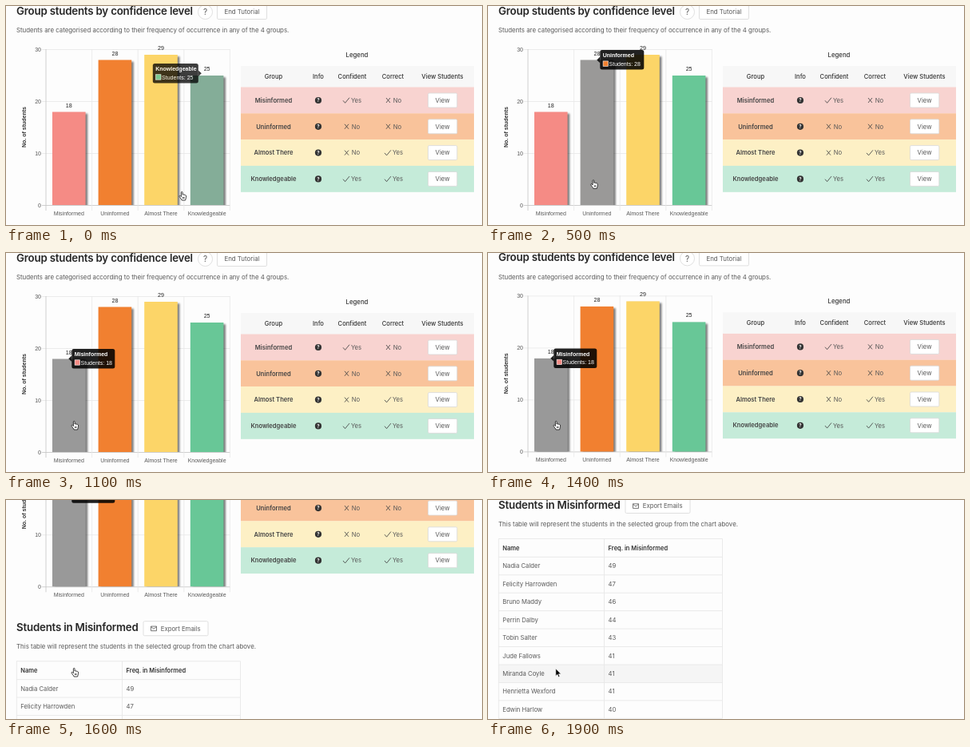
Recreate the animation shown at these times as an HTML page. Size 596 by 274 pixels, loop 2500 ms.

```html
<!DOCTYPE html>
<html lang="en">
<head>
<meta charset="utf-8">
<title>Students by confidence level</title>
<style>
  html, body { margin: 0; width: 100%; height: 100%; overflow: hidden; background: #fdfdfd; }
  svg { display: block; width: 596px; height: 274px; font-family: Inter, sans-serif; }
  .chart { font-family: "Liberation Sans", Arial, sans-serif; }
</style>
</head>
<body>
<svg id="stage" viewBox="0 0 596 274">
  <defs>
    <filter id="soft" x="-20%" y="-10%" width="140%" height="120%"><feGaussianBlur stdDeviation="1.3"/></filter>
    <clipPath id="plot"><rect x="50" y="40" width="231" height="209"/></clipPath>
  </defs>
</svg>
<script>
const LOOP = 2500, STEP = 100, SCROLL = 294;
const stage = document.getElementById('stage');

function add(parent, tag, attrs = {}, text) {
  const node = document.createElementNS('http://www.w3.org/2000/svg', tag);
  set(node, attrs);
  if (text !== undefined) node.textContent = text;
  parent.append(node);
  return node;
}
function set(node, attrs) {
  for (const key in attrs) node.setAttribute(key, attrs[key]);
}
const rect = (p, x, y, width, height, fill, more) => add(p, 'rect', { x, y, width, height, fill, ...more });
const line = (p, d, stroke = '#e5e5e5', width = 1, more) =>
  add(p, 'path', { d, stroke, 'stroke-width': width, fill: 'none', ...more });
const label = (p, x, y, text, size, more) =>
  add(p, 'text', { x, y, 'font-size': size, fill: '#595959', ...more }, text);
const MID = { 'text-anchor': 'middle' };
const BOLD = { 'font-weight': 600, fill: '#333' };

function button(x, y, w, h, text, textX, size = 7.8) {
  rect(page, x, y, w, h, '#fff', { rx: 1.5, stroke: '#d9d9d9', 'stroke-width': .8 });
  return label(page, textX, y + h / 2 + 2.8, text, size, MID);
}

const page = add(stage, 'g');

// Heading
const HEAD = { 'font-weight': 600, fill: '#262626', 'letter-spacing': '-.2' };
label(page, 13, 11, 'Group students by confidence level', 13.3, HEAD);
add(page, 'circle', { cx: 249.5, cy: 7.5, r: 9, fill: '#fff', stroke: '#d9d9d9', 'stroke-width': .8 });
label(page, 249.5, 11.2, '?', 10, MID);
button(264.5, -1.5, 62, 18, 'End Tutorial', 295.5, 7.9);
label(page, 13, 33.2, 'Students are categorised according to their frequency of occurrence in any of the 4 groups.', 7.86);

// Bar chart
const groups = [
  { name: 'Misinformed', count: 18, rgb: [245, 139, 133], tint: '#f8d3d0', confident: true, correct: false },
  { name: 'Uninformed', count: 28, rgb: [241, 128, 48], tint: '#f9c39b', confident: false, correct: false },
  { name: 'Almost There', count: 29, rgb: [252, 213, 104], tint: '#fdf0c5', confident: false, correct: true },
  { name: 'Knowledgeable', count: 25, rgb: [104, 199, 151], tint: '#c5ebd9', confident: true, correct: true }
];
const BASE = 249.5, UNIT = 6.5, SLOT = 57.6;
const chart = add(page, 'g', { class: 'chart' });
for (let n = 0; n <= 30; n += 10) {
  const y = BASE - n * UNIT;
  line(chart, `M45 ${y}H280.5`, n ? '#e8e8e8' : '#c4c4c4', .8);
  label(chart, 44, y + 2.5, n, 7, { 'text-anchor': 'end' });
}
for (let i = 0; i <= 4; i++) line(chart, `M${50 + i * SLOT} 54V256`, i ? '#e8e8e8' : '#c4c4c4', .8);
label(chart, 0, 0, 'No. of students', 7, { ...MID, ...BOLD, transform: 'translate(25.3 151.5) rotate(-90)' });

const bars = add(chart, 'g', { 'clip-path': 'url(#plot)' });
groups.forEach((g, i) => {
  g.mid = 50 + SLOT * (i + .5);
  g.top = BASE - g.count * UNIT;
  const x = g.mid - 20.8, h = BASE - g.top;
  rect(bars, x + 2.6, g.top + 2.2, 41.6, h + 8, '#000', { opacity: .5, filter: 'url(#soft)' });
  g.bar = rect(bars, x, g.top, 41.6, h);
  label(chart, g.mid, g.top - 6, g.count, 7.1, { ...MID, fill: '#222' });
  label(chart, g.mid, 262, g.name, 7, MID);
});

// Legend
const columns = [335, 391, 433.5, 484.5, 546.5];
label(page, 439.5, 64, 'Legend', 7.8, { ...MID, fill: '#333', 'font-weight': 500 });
rect(page, 294, 75, 292, 26.5, '#f7f7f7');
['Group', 'Info', 'Confident', 'Correct', 'View Students'].forEach((text, i) =>
  label(page, columns[i], 90.8, text, 7.6, { ...MID, ...BOLD, 'font-weight': 500 }));

function verdict(x, y, yes) {
  line(page, yes ? `M${x - 11.5} ${y + .3}l2.6 3 5.4 -6.6` : `M${x - 9.5} ${y - 3}l5 6m0 -6l-5 6`, '#444', .85);
  label(page, x - (yes ? 1.6 : .8), y + 2.8, yes ? 'Yes' : 'No', 7.7);
}
groups.forEach((g, i) => {
  const y = 118 + i * 32.8;
  rect(page, 294, y - 16.5, 292, 32.9, g.tint);
  label(page, 335, y + 2.7, g.name, 7.6, { ...MID, ...BOLD, fill: '#444' });
  add(page, 'circle', { cx: 391, cy: y, r: 4.1, fill: '#333' });
  label(page, 391, y + 2.2, '?', 6, { ...MID, fill: '#fff', 'font-weight': 700 });
  verdict(433.5, y, g.confident);
  verdict(485.5, y, g.correct);
  button(528.5, y - 9, 36.3, 18, 'View', 546.6);
});

// Student table
label(page, 13, 304.8, 'Students in Misinformed', 13.3, HEAD);
button(172, 292.5, 81, 18, 'Export Emails', 218.7);
line(page, 'M181.5 298.8h7v5.6h-7zM181.5 299.2l3.5 2.8 3.5 -2.8', '#555', .8);
label(page, 13, 327, 'This table will represent the students in the selected group from the chart above.', 7.88);

const students = [
  ['Nadia Calder', 49], ['Felicity Harrowden', 47], ['Bruno Maddy', 46],
  ['Perrin Dalby', 44], ['Tobin Salter', 43], ['Jude Fallows', 41],
  ['Miranda Coyle', 41], ['Henrietta Wexford', 41], ['Edwin Harlow', 40]
];
const TOP = 342.5, ROW = 22.45;
const rowTop = i => TOP + 22.8 + i * ROW;
const rowHover = rect(page, 13, rowTop(6), 280.5, ROW, '#f5f5f5');
label(page, 18.3, 356.7, 'Name', 7.5, BOLD);
label(page, 150.6, 356.7, 'Freq. in Misinformed', 7.5, BOLD);
line(page, `M13 ${TOP}H293.5`, '#e8e8e8', .9);
students.forEach(([name, freq], i) => {
  line(page, `M13 ${rowTop(i)}H293.5`, '#e8e8e8', .9);
  label(page, 18.3, rowTop(i) + 14, name, 7.7);
  label(page, 150.6, rowTop(i) + 14, freq, 7.7);
});
line(page, `M13 ${rowTop(9)}H293.5M13.4 ${TOP}V${rowTop(9)}M145.5 ${TOP}V${rowTop(9)}M293.5 ${TOP}V${rowTop(9)}`, '#e8e8e8', .9);

// Tooltip
const tip = add(page, 'g', { class: 'chart' });
const tipBox = rect(tip, 0, 0, 55, 24.5, '#000', { rx: 2.5, 'fill-opacity': .87 });
const tipCaret = add(tip, 'path', { 'fill-opacity': .87 });
const tipTitle = label(tip, 3.4, 9.2, '', 7, { fill: '#fff', 'font-weight': 700 });
const tipSwatch = rect(tip, 3.8, 13.8, 6.4, 6.4, '', { stroke: '#fff', 'stroke-width': .6 });
const tipBody = label(tip, 11.3, 19.6, '', 7, { fill: '#fff' });

// Pointers
const hand = add(stage, 'path', {
  d: 'M-1.6 -4.8c0 -1.1 1.7 -1.1 1.7 0v2.8c.3 -.6 1.5 -.5 1.6 .3c.4 -.5 1.4 -.3 1.5 .4c.5 -.4 1.3 0 1.3 .7v2.2c0 1.4 -.9 1.9 -.9 3.4h-4.5c-.3 -1.5 -1.9 -2.5 -3 -4.6c-.4 -.9 .7 -1.5 1.3 -.8l1 1zM.6 1v2M2 1v2',
  fill: '#fff', stroke: '#111', 'stroke-width': .8, 'stroke-linejoin': 'round'
});
const arrow = add(stage, 'path', {
  d: 'M84.8 211v9.3l2.1 -2 1.4 3.2 1.5 -.7 -1.4 -3h3z', fill: '#000', stroke: '#fff', 'stroke-width': .6
});

// Motion: each hover pulls the tooltip to its bar and greys the bar
const easeOut = u => 1 - (1 - u) ** 4;
const easeInOut = u => u < .5 ? 4 * u ** 3 : 1 - 4 * (1 - u) ** 3;
const clamp = u => Math.min(1, Math.max(0, u));
const mix = (a, b, u) => a + (b - a) * u;
const hovers = [
  { start: -75, group: groups[3], from: [174.5, 68], to: [191, 75], width: 57, fade: .7 },
  { start: 180, group: groups[2], from: [191, 75], to: [136, 48], width: 55, fade: .6, leftSide: true },
  { start: 225, group: groups[1], from: [169.5, 66], to: [140, 55], width: 55, fade: .6 },
  { start: 750, group: groups[0], from: [140, 55], to: [82.3, 120], width: 54, fade: .4 }
];
hovers[0].leftSide = true;
const pointer = [[0, 221, 238], [100, 208, 235], [200, 180, 231], [300, 134, 224], [600, 132, 223], [700, 108, 219], [800, 86, 216], [LOOP, 86, 216]];

function pointerAt(t) {
  const i = pointer.findIndex(p => p[0] > t);
  const [t0, x0, y0] = pointer[i - 1], [t1, x1, y1] = pointer[i];
  const u = (t - t0) / (t1 - t0);
  return [mix(x0, x1, u), mix(y0, y1, u)];
}

function draw(t) {
  const hover = hovers.filter(h => h.start <= t).pop();
  const { group, from, to, width, leftSide } = hover;
  const u = easeOut(clamp((t - hover.start) / 400));
  groups.forEach(g => set(g.bar, {
    fill: `rgb(${g.rgb.map(c => Math.round(mix(c, 153, g === group ? u : 0)))})`
  }));
  set(tip, {
    transform: `translate(${mix(from[0], to[0], u)} ${mix(from[1], to[1], u)})`,
    opacity: mix(hover.fade, 1, u)
  });
  set(tipBox, { width });
  set(tipCaret, { d: leftSide ? `M${width} 8.5l4 3.8 -4 3.8z` : 'M0 8.5l-4 3.8 4 3.8z' });
  set(tipSwatch, { fill: `rgb(${group.rgb})` });
  tipTitle.textContent = group.name;
  tipBody.textContent = `Students: ${group.count}`;

  const scroll = SCROLL * easeInOut(clamp((t - 1361) / 485));
  set(page, { transform: `translate(0 ${-scroll})` });
  const done = t >= 1900;
  set(rowHover, { opacity: done ? 1 : 0 });
  set(hand, { transform: `translate(${pointerAt(t)})`, opacity: done ? 0 : 1 });
  set(arrow, { opacity: done ? 1 : 0 });
}

const begin = performance.now();
function tick() {
  const t = (performance.now() - begin) % LOOP;
  draw(Math.floor(t / STEP) * STEP);
  requestAnimationFrame(tick);
}
tick();
</script>
</body>
</html>
```
